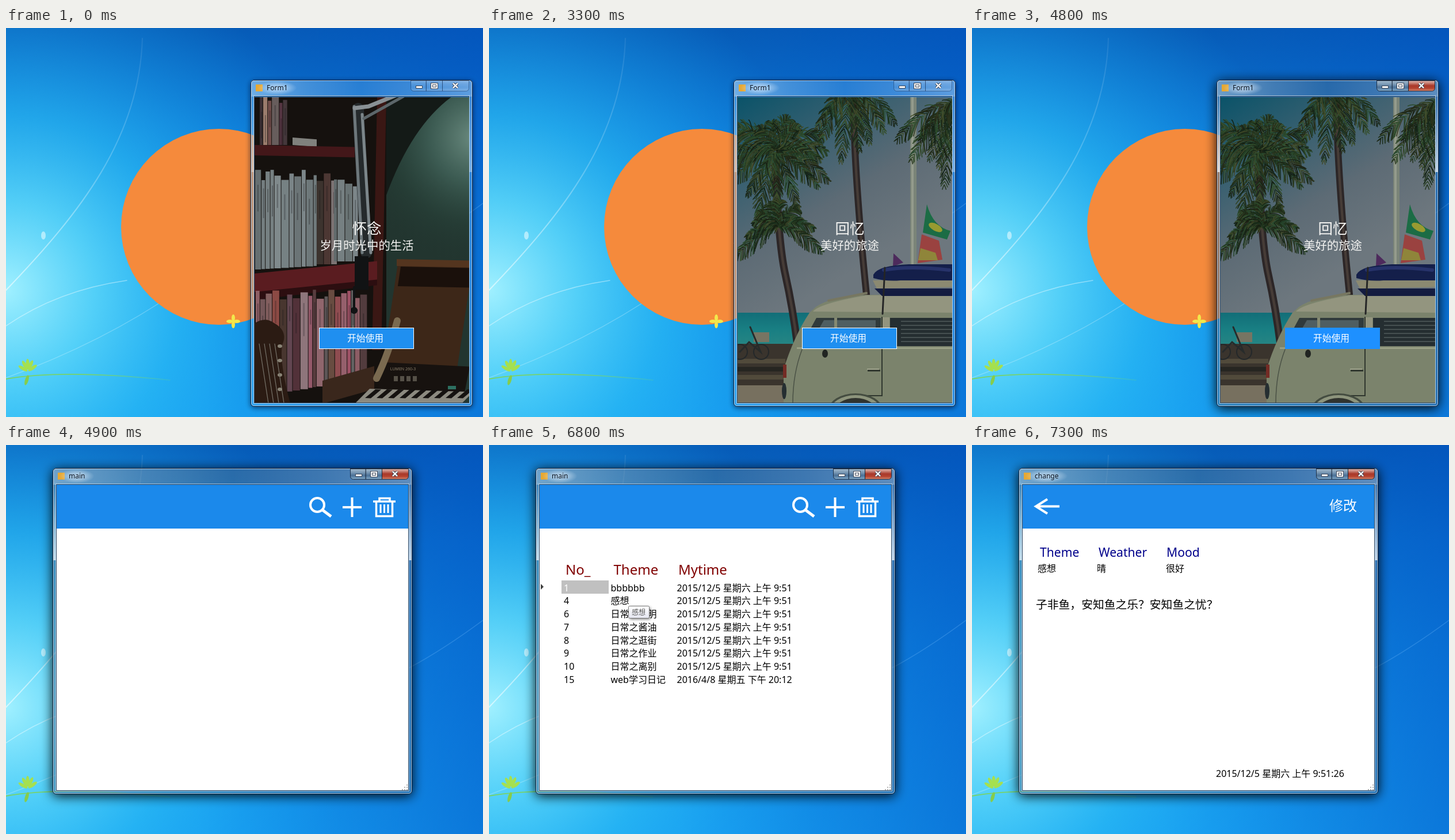
Recreate the animation shown at these times as an HTML page with a canvas. Size 829 by 675 pixels, loop 8000 ms.

```html
<!DOCTYPE html>
<html lang="zh-CN">
<head>
<meta charset="utf-8">
<title>Diary</title>
<style>
html, body { margin: 0; width: 100%; height: 100%; overflow: hidden; background: #0a78de; }
canvas { display: block; width: 829px; height: 675px; }
</style>
</head>
<body>
<canvas id="stage" width="829" height="675"></canvas>
<script>
const c = document.getElementById('stage').getContext('2d');
const FONT = '"Noto Sans", "Noto Sans CJK SC", sans-serif';
const LOOP = 8000;
const CUES = [0, 500, 3300, 4700, 4900, 5100, 6800, 7100, 7200, 7300];

function seeded(seed) {
  return () => (seed = (seed * 16807) % 2147483647) / 2147483647;
}

function repeat(n, paint) {
  for (let i = 0; i < n; i++) paint(i);
}

function text(s, x, y, size, color, align = 'left', weight = 400) {
  c.font = `${weight} ${size}px ${FONT}`;
  c.textAlign = align;
  c.fillStyle = color;
  c.fillText(s, x, y);
}

function box(color, x, y, w, h) {
  c.fillStyle = color;
  c.fillRect(x, y, w, h);
}

// Paints unit-square content onto the parallelogram spanned by u and v.
function plane(x, y, [ux, uy], [vx, vy], paint) {
  c.save();
  c.transform(ux, uy, vx, vy, x, y);
  paint();
  c.restore();
}

function slab(color, x, y, w, h, rise = 0, lean = 0) {
  plane(x, y, [w, w * rise], [h * lean, h], () => box(color, 0, 0, 1, 1));
}

function line(color, width, x1, y1, x2, y2) {
  c.beginPath();
  c.moveTo(x1, y1);
  c.lineTo(x2, y2);
  c.strokeStyle = color;
  c.lineWidth = width;
  c.stroke();
}

function curve(color, width, d) {
  c.strokeStyle = color;
  c.lineWidth = width;
  c.stroke(new Path2D(d));
}

function shape(color, d) {
  c.fillStyle = color;
  c.fill(new Path2D(d));
}

function oval(color, x, y, rx, ry = rx, turn = 0) {
  c.beginPath();
  c.ellipse(x, y, rx, ry, turn, 0, Math.PI * 2);
  c.fillStyle = color;
  c.fill();
}

function ring(color, width, x, y, r) {
  c.beginPath();
  c.arc(x, y, r, 0, Math.PI * 2);
  c.strokeStyle = color;
  c.lineWidth = width;
  c.stroke();
}

function stops(g, list) {
  list.forEach((s, i) => g.addColorStop(i / (list.length - 1), s));
  return g;
}
const linear = (x1, y1, x2, y2, ...s) => stops(c.createLinearGradient(x1, y1, x2, y2), s);
const radial = (x, y, r, ...s) => stops(c.createRadialGradient(x, y, 0, x, y, r), s);

// ---- desktop ----
function desktop() {
  box(linear(0, 0, 0, 675, '#075cb6', '#0c76d2', '#108ae2', '#1496ec', '#17a0f2'), 0, 0, 829, 675);
  box(linear(330, 0, 829, 0, 'rgba(0,80,195,0)', 'rgba(0,80,195,.5)'), 0, 0, 829, 675);
  box(radial(0, 455, 610, 'rgba(160,240,255,1)', 'rgba(92,216,250,.88)', 'rgba(42,186,244,.7)',
    'rgba(28,165,240,.35)', 'rgba(20,150,235,0)'), 0, 0, 829, 675);

  c.lineCap = 'round';
  const fade = linear(237, 18, 0, 455, 'rgba(255,255,255,.08)', 'rgba(255,255,255,.25)', 'rgba(255,255,255,.55)');
  curve(fade, 2, 'M237 18C232 190 130 320 0 455');
  curve('rgba(255,255,255,.4)', 1.5, 'M0 517Q90 455 210 438');
  curve('rgba(255,255,255,.25)', 1.5, 'M0 607Q170 545 300 455');
  curve('rgba(130,200,255,.25)', 1.5, 'M700 387Q760 355 829 304');
  oval('rgba(220,248,255,.65)', 65, 360, 4, 7);

  curve(linear(0, 0, 285, 0, '#77d36a', '#77d36a', 'rgba(100,210,140,.2)'), 1.8, 'M0 609Q100 592 285 611');
  repeat(5, i => {
    const a = -2.6 + i * .5;
    oval('#a5e04f', 38 + 10 * Math.cos(a), 599 + 16 * Math.sin(a), 9, 3, a);
  });
  oval('#86cc4c', 36, 611, 3, 9, .3);

  oval('#f58a3c', 370, 345, 170);
  repeat(4, i => {
    const a = i * Math.PI / 2;
    oval('#f2e84c', 395 + 6 * Math.cos(a), 509 + 6 * Math.sin(a), 6, 3, a);
  });
}

// ---- window chrome ----
function caption(x, y, active) {
  const shade = (...s) => linear(0, y, 0, y + 18, ...s);
  const glass = active ? shade('#a4bacd', '#7f9db8', '#4a7096', '#7fa8c8')
    : shade('rgba(255,255,255,.3)', 'rgba(255,255,255,.12)', 'rgba(255,255,255,.05)', 'rgba(255,255,255,.2)');
  const red = shade('#dcb6ae', '#ca8478', '#a9382a', '#b5432f', '#d08068');
  const ink = '#3c4658';
  c.lineWidth = 1;
  let left = x;
  [27, 28, 46].forEach((w, i) => {
    c.beginPath();
    c.roundRect(left + .5, y + .5, w, 18, [0, 0, i === 2 ? 5 : 0, i === 0 ? 5 : 0]);
    c.fillStyle = active && i === 2 ? red : glass;
    c.fill();
    c.strokeStyle = active ? 'rgba(20,35,55,.85)' : 'rgba(20,50,95,.5)';
    c.stroke();
    left += w;
  });
  c.lineCap = 'butt';
  box(ink, x + 9, y + 9, 12, 5);
  box('#fff', x + 10, y + 10, 10, 3);
  [[ink, 0], ['#fff', 1], [ink, 3], ['#fff', 4]].forEach(([color, d]) =>
    box(color, x + 35 + d, y + 4 + d, 13 - 2 * d, 11 - 2 * d));
  for (const [color, w] of [[ink, 4.5], ['#fff', 2.4]]) {
    line(color, w, x + 74, y + 5, x + 82, y + 13);
    line(color, w, x + 82, y + 5, x + 74, y + 13);
  }
}

function frame(x, y, w, h, title, active) {
  const outline = inset => {
    c.beginPath();
    c.roundRect(x + inset, y + inset, w - 2 * inset, h - 2 * inset, 6 - inset);
  };
  c.save();
  c.beginPath();
  c.rect(0, 0, 829, 675);
  c.roundRect(x, y, w, h, 6);
  c.clip('evenodd');
  c.shadowColor = active ? 'rgba(0,0,0,.95)' : 'rgba(0,15,50,.7)';
  c.shadowBlur = active ? 20 : 10;
  c.shadowOffsetY = active ? 3 : 2;
  outline(0);
  c.fillStyle = '#000';
  c.fill();
  c.restore();

  c.save();
  outline(0);
  c.clip();
  box(active ? 'rgba(68,112,150,.55)' : 'rgba(95,170,235,.38)', x, y, w, h);
  box(linear(x, 0, x + w, 0, 'rgba(255,255,255,.32)', 'rgba(255,255,255,.12)',
    'rgba(255,255,255,0)', 'rgba(255,255,255,.1)', 'rgba(255,255,255,.25)'), x, y, w, 29);
  const sheen = linear(0, y + 25, 0, y + 160, 'rgba(255,255,255,.05)',
    `rgba(255,255,255,${active ? .7 : .35})`);
  for (const side of [x, x + w - 7]) box(sheen, side, y + 25, 7, 135);
  c.restore();

  c.lineWidth = 1;
  outline(.5);
  c.strokeStyle = 'rgba(8,22,45,.9)';
  c.stroke();
  outline(1.5);
  c.strokeStyle = 'rgba(225,242,255,.65)';
  c.stroke();
  c.strokeRect(x + 5.5, y + 27.5, w - 11, h - 33);
  c.strokeStyle = '#27425f';
  c.strokeRect(x + 6.5, y + 28.5, w - 13, h - 35);

  box('#e6a834', x + 9, y + 8, 12, 12);
  c.font = `12px ${FONT}`;
  const tw = c.measureText(title).width;
  plane(x + 28 + tw / 2, y + 14, [tw / 2 + 16, 0], [0, 12], () =>
    oval(radial(0, 0, 1, 'rgba(235,245,255,.6)', 'rgba(235,245,255,.4)', 'rgba(235,245,255,0)'), 0, 0, 1));
  text(title, x + 28, y + 18, 12, '#0b1420');
  caption(x + w - 108, y + 1, active);
}

// ---- pictures ----
function books(rnd, x0, x1, top, base, slope, tint) {
  for (let x = x0; x < x1;) {
    const w = 6 + rnd() * 8, y = top + rnd() * 18;
    box(tint(rnd), x, y, w - 1, base + (x - x0) * slope - y);
    box('rgba(20,20,25,.3)', x + w * .35, y + 14 + rnd() * 20, 2, 24 + rnd() * 35);
    x += w;
  }
}
const paper = rnd => `hsl(190 5% ${40 + rnd() * 13}%)`;
const cloth = rnd => `hsl(${330 + rnd() * 50} ${rnd() * 35}% ${20 + rnd() * 32}%)`;

function library() {
  const rnd = seeded(77);
  box('#15110e', 431, 119, 375, 532);
  box('#22352f', 661, 119, 145, 532);
  box(radial(815, 190, 230, 'rgba(120,154,142,.85)', 'rgba(72,108,98,.7)', 'rgba(45,76,66,.3)',
    'rgba(32,50,45,0)'), 661, 119, 145, 440);
  shape('#141a17', 'M661 119H775Q705 170 661 290Z');
  slab('#3a1714', 645, 119, 16, 440, 0, -.02);

  books(rnd, 441, 488, 112, 203, 0, cloth);
  slab('#80817d', 498, 190, 42, 13, .08);
  slab('#431719', 431, 203, 175, 18, .02);
  books(rnd, 433, 540, 246, 419, -.06, paper);
  books(rnd, 540, 570, 252, 410, 0, cloth);
  books(rnd, 570, 610, 262, 405, 0, paper);
  slab('#2c0e10', 431, 434, 214, 38, -.12);
  slab('#5a1c20', 431, 426, 214, 32, -.1);
  books(rnd, 434, 622, 454, 640, -.17, cloth);

  c.lineCap = 'round';
  line('#252a2c', 20, 612, 140, 626, 390);
  line('#6d777b', 5, 605, 136, 619, 390);
  line('#7c868a', 5, 619, 150, 634, 390);
  curve('#899094', 7, 'M606 139L630 136L682 115');
  line('#5c666a', 5, 622, 157, 690, 119);
  box('#111314', 606, 396, 24, 58);
  line('#111314', 4, 605, 450, 605, 490);
  oval('#111314', 605, 490, 6);

  slab('#3d2718', 682, 402, 130, 185, .02, -.15);
  slab('#1a100b', 686, 414, 125, 34, .02, -.15);
  slab('#54351f', 679, 401, 127, 12, .02);
  slab('#17120f', 655, 580, 151, 50, .05, -.2);
  slab('#3a271c', 550, 612, 90, 40, -.28);
  curve('#7a6a50', 12, 'M680 508Q665 565 644 608');
  slab('#8c8a80', 632, 626, 180, 28, .03, -1);
  repeat(9, i => slab('#151210', 642 + i * 20, 627, 10, 15, .05, -1.2));
  repeat(4, i => box('#555047', 674 + i * 11, 604, 7, 9));
  box('#2d7061', 768, 621, 14, 6);
  text('LUMEN 260-3', 690, 594, 7, '#8c806b', 'center');

  shape('#2b1b13', 'M431 513Q450 500 466 512Q491 526 480 550Q475 580 494 651H431Z');
  repeat(4, i => {
    line('#77736a', 1.2, 440 + i * 9, 548, 456 + i * 9, 651);
    oval('#8b8577', 476, 552 + i * 25, 4, 3);
  });
}

function desk() {
  const rnd = seeded(12), dark = '#1a161c', ink = 'rgba(38,30,24,.7)';
  box(linear(0, 119, 0, 651, '#100b08', '#1a100a', '#22160d', '#543515', '#6a441a', '#5a3813'), 431, 119, 375, 532);
  box(radial(640, 195, 130, 'rgba(74,40,15,.55)', 'rgba(40,22,10,0)'), 500, 119, 306, 210);
  slab('#2b1c12', 690, 200, 116, 45);
  slab('#4b4537', 680, 150, 126, 55, 0, .2);
  oval('#706a5c', 743, 150, 67, 11);
  oval('#3b342a', 743, 153, 56, 7);
  line('#7a1723', 11, 740, 119, 743, 195);
  slab('#131010', 431, 255, 180, 84, -.05);
  slab('#211b18', 431, 252, 180, 74, -.05);

  const board = (x, y, cols, rows) => plane(x, y, [32, 6], [-8, 27], () => {
    for (let r = 0; r < rows; r++) for (let k = 0; k < cols; k++)
      box((r + k) % 2 ? '#704719' : '#251b13', k, r, 1, 1);
  });
  board(442, 345, 6, 2);
  board(590, 400, 6, 4);

  plane(545, 349, [167, -101], [261, 112], () => {
    box('#6b6757', -.04, 0, 1, 1);
    box(dark, .03, -.02, 1, .98);
    box('#29212f', .16, .12, .76, .9);
    box('#5f584b', .7, .2, .18, .2);
    box('#5a5350', .42, .28, .14, .18);
    repeat(5, i => box('#5a5059', .24 + i * .06, .55, .02, .25));
  });

  plane(431, 381, [219, 25], [-28, 215], () => {
    box('#3b2411', 0, 1, 1, .1);
    box('#584728', 0, 1, 1, .05);
    box(linear(0, 0, 1, 1, '#706249', '#88775a', '#78643f'), 0, 0, 1, 1);
    repeat(20, i => box(ink, .12 + rnd() * .7, .56 + rnd() * .36, .04 + rnd() * .08, .006));
    repeat(4, i => {
      box(ink, .2 + i % 2 * .09, .34 + (i >> 1) * .09, .08, .08);
      box('#88775a', .206 + i % 2 * .09, .346 + (i >> 1) * .09, .068, .068);
    });
    box(ink, .64, .34, .2, .12);
    box('#84734f', .646, .346, .188, .108);
  });

  c.lineCap = 'round';
  line('rgba(45,28,16,.5)', 11, 445, 519, 612, 450);
  line('#756d5c', 13, 438, 508, 500, 486);
  line('#302c28', 10, 500, 485, 586, 451);
  line('#aa813a', 7, 466, 497, 500, 485);
  line('#a69c87', 3, 506, 479, 584, 449);
  line('#777268', 7, 590, 450, 624, 437);
  line('#7b694b', 12, 768, 434, 771, 484);
  slab('#7b694b', 757, 466, 32, 22, .1);
}

function frond(rnd, x, y, angle, len) {
  const dx = Math.cos(angle) * len, dy = Math.sin(angle) * len, droop = len * .45;
  c.lineWidth = 1.5;
  repeat(34, i => {
    const t = i / 33, px = x + dx * t, py = y + dy * t + droop * t * t;
    const heading = Math.atan2(dy + 2 * droop * t, dx);
    const size = len * .25 * Math.sin(Math.PI * (.12 + t * .8));
    c.strokeStyle = `hsl(${70 + rnd() * 70} 28% ${9 + rnd() * 16}%)`;
    for (const side of [-1, 1]) {
      const a = heading + side * (.4 + rnd() * .5);
      c.beginPath();
      c.moveTo(px, py);
      c.quadraticCurveTo(px + Math.cos(a) * size * .6, py + Math.sin(a) * size * .6,
        px + Math.cos(a) * size, py + Math.sin(a) * size + size * .35);
      c.stroke();
    }
  });
}

function crown(rnd, x, y, len, from, to, n) {
  repeat(n, i => frond(rnd, x, y, from + (to - from) * (i + rnd() * .5) / n, len * (.75 + rnd() * .4)));
}

function trunk(width, d) {
  curve('#2c2627', width, d);
  curve('#463c37', width * .35, d);
}

function van() {
  const body = '#7b836c', glass = '#252e31', cream = '#93957f';
  shape(body, 'M568 484Q594 466 655 463H806V651H512V592Q530 535 557 494Z');
  shape(cream, 'M563 492Q574 478 655 464L806 462V494Z');
  shape('#303a3b', 'M569 503H681V549H544Z');
  shape('#4f5e61', 'M582 507H672V542H562Z');
  slab('#858a72', 600, 503, 5, 48);
  box(cream, 683, 502, 13, 50);
  box(glass, 697, 503, 109, 49);
  repeat(6, i => box('#465051', 716, 508 + i * 7, 90, 2));
  box('#99a085', 535, 554, 271, 3);
  curve('#4a5145', 1.5, 'M544 558Q528 600 528 651');
  curve('#30372f', 2, 'M683 502V638H648');
  c.save();
  c.beginPath();
  c.rect(512, 558, 294, 93);
  c.clip();
  oval('#444c40', 637, 663, 47, 29);
  oval('#8d947c', 637, 665, 44, 28);
  oval('#30332e', 637, 668, 38, 26);
  c.restore();
  box('#31382f', 658, 593, 22, 3);
  box('#a2a68f', 657, 591, 21, 2);
  oval('#202421', 584, 565, 5, 7);
  box('#742b25', 511, 584, 6, 23);
  oval(glass, 513, 630, 4, 14);
}

function coast() {
  const rnd = seeded(31);
  box(linear(431, 119, 620, 430, '#0a5369', '#365f70', '#5d6b75', '#6d777e'), 431, 119, 375, 532);
  box(linear(0, 494, 0, 552, '#126e78', '#197f83', '#278583'), 431, 494, 150, 60);
  box('#3a342d', 431, 548, 120, 72);
  box('#77705f', 431, 620, 120, 31);

  c.lineCap = 'round';
  trunk(12, 'M633 119Q635 260 656 462');
  trunk(13, 'M498 225Q502 370 515 428T536 550');
  box('#7a8478', 732, 119, 11, 292);
  box('#949b8c', 734, 119, 4, 292);
  crown(rnd, 497, 212, 105, -3.4, .3, 13);
  crown(rnd, 498, 216, 75, .3, 2.8, 5);
  crown(rnd, 503, 345, 70, -3.4, .3, 10);
  crown(rnd, 628, 95, 90, .3, 2.8, 7);
  crown(rnd, 815, 125, 95, 1.5, 3.1, 7);

  shape('#1b6c45', 'M761 306Q772 345 802 352L796 367L754 355Z');
  oval('#989a31', 776, 346, 13, 6, .5);
  shape('#9a4240', 'M752 358L782 369L788 402L745 408Z');
  shape('#8f853a', 'M750 382L776 390L780 403H746Z');
  shape('#4d2a5c', 'M703 391L720 407L702 414Z');

  repeat(3, i => box(i % 2 ? '#262521' : '#514a3b', 431, 574 + i * 14, 84, 8));
  box('#777563', 460, 528, 27, 17);
  for (const x of [436, 473]) ring('#24282a', 2, x, 562, 13);
  curve('#272b2b', 3, 'M436 562L452 545L472 562L454 519');
  van();

  slab('#8b8971', 667, 438, 140, 14, -.02, .5);
  slab('#141c40', 670, 452, 140, 13, 0, 1);
  shape('#141f4a', 'M668 428Q676 412 730 410H806V438H715Q690 440 668 434Z');
  curve('#27336b', 6, 'M686 420Q730 412 800 420');
  line('#242526', 3, 688, 416, 684, 496);
  line('#777761', 4, 590, 473, 656, 460);
}

const PAGES = [
  [library, '怀念', '岁月时光中的生活'],
  [desk, '记录', '奋斗的点滴'],
  [coast, '回忆', '美好的旅途'],
];

function intro(scene) {
  const active = scene === 3;
  const [picture, head, sub] = PAGES[Math.min(scene, 2)];
  frame(425, 90, 386, 567, 'Form1', active);
  c.save();
  c.beginPath();
  c.rect(432, 120, 373, 530);
  c.clip();
  picture();
  c.restore();
  text(head, 627, 357, 25.5, '#f4f4f2', 'center', 300);
  text(sub, 627, 385, 20.4, '#f4f4f2', 'center');
  box(active ? '#1e90ff' : '#fff', 544, 520, 165, 37);
  if (!active) box('#1f8ff0', 545, 521, 163, 35);
  text('开始使用', 624.5, 544, 15.8, '#fff', 'center');
}

// ---- diary windows ----
function page(title) {
  frame(81, 40, 625, 566, title, true);
  box('#fff', 88, 69, 611, 530);
  box('#1b89eb', 88, 69, 611, 76);
  for (let r = 0; r < 3; r++) for (let k = 0; k <= r; k++)
    box('#b5b5b5', 696 - k * 4, 589 + r * 4, 2, 2);
  c.lineCap = 'butt';
}

function tools() {
  ring('#fff', 4, 541, 104, 12);
  line('#fff', 5, 549, 112, 565, 124);
  line('#fff', 4, 585, 108, 618, 108);
  line('#fff', 4, 601.5, 91, 601.5, 125);
  curve('#fff', 3.5, 'M638 98H677M643.5 98V123.5H671.5V98M649 98V92.5H667V98');
  repeat(3, i => box('#fff', 649.5 + i * 6.5, 103, 3, 15));
}

function table() {
  const day = '2015/12/5 星期六 上午 9:51';
  const rows = [['1', 'bbbbbb'], ['4', '感想'], ['6', '日常之黎明'], ['7', '日常之酱油'],
    ['8', '日常之逛街'], ['9', '日常之作业'], ['10', '日常之离别'],
    ['15', 'web学习日记', '2016/4/8 星期五 下午 20:12']];
  text('No_', 133, 225, 24, '#800000');
  text('Theme', 216.5, 225, 24, '#800000');
  text('Mytime', 329, 225, 24, '#800000');
  box('#c0c0c0', 126, 235, 82, 23);
  shape('#404040', 'M90 241L95 246L90 251Z');
  rows.forEach(([id, theme, when = day], i) => {
    const y = 253.5 + i * 22.75;
    text(id, 130, y, 16, i ? '#000' : '#fff');
    text(theme, 211.5, y, 16, '#000');
    text(when, 326.5, y, 16, '#000');
  });
}

function tooltip() {
  c.save();
  c.shadowColor = 'rgba(0,0,0,.5)';
  c.shadowBlur = 4;
  c.shadowOffsetX = c.shadowOffsetY = 2;
  c.beginPath();
  c.roundRect(242.5, 279.5, 36, 21, 2);
  c.fillStyle = linear(0, 280, 0, 301, '#fff', '#e4e5f0');
  c.fill();
  c.restore();
  c.strokeStyle = '#767676';
  c.lineWidth = 1;
  c.stroke();
  text('感想', 248, 294.5, 12, '#575757');
}

function entry(scene) {
  curve('#fff', 4, 'M152 106.5H111M131 94L111 106.5L131 119');
  text('修改', 621, 114, 24, '#fff');
  if (scene < 8) return;
  [['Theme', 118, '感想', 114], ['Weather', 220, '晴', 217], ['Mood', 338, '很好', 337]].forEach(([label, x, value, vx]) => {
    text(label, x, 194, 21.1, '#00008b');
    text(value, vx, 220, 16, '#000');
  });
  if (scene < 9) return;
  text('子非鱼，安知鱼之乐？安知鱼之忧？', 111, 283.5, 19.8, '#000');
  text('2015/12/5 星期六 上午 9:51:26', 424, 575.5, 16, '#000');
}

function draw(scene) {
  desktop();
  if (scene < 4) return intro(scene);
  page(scene < 7 ? 'main' : 'change');
  if (scene >= 7) return entry(scene);
  tools();
  if (scene >= 5) table();
  if (scene === 6) tooltip();
}

let shown = -1;
const start = performance.now();
function tick() {
  const t = (performance.now() - start) % LOOP;
  const scene = CUES.findLastIndex(cue => t >= cue);
  if (scene !== shown) draw(shown = scene);
  requestAnimationFrame(tick);
}
tick();
</script>
</body>
</html>
```
